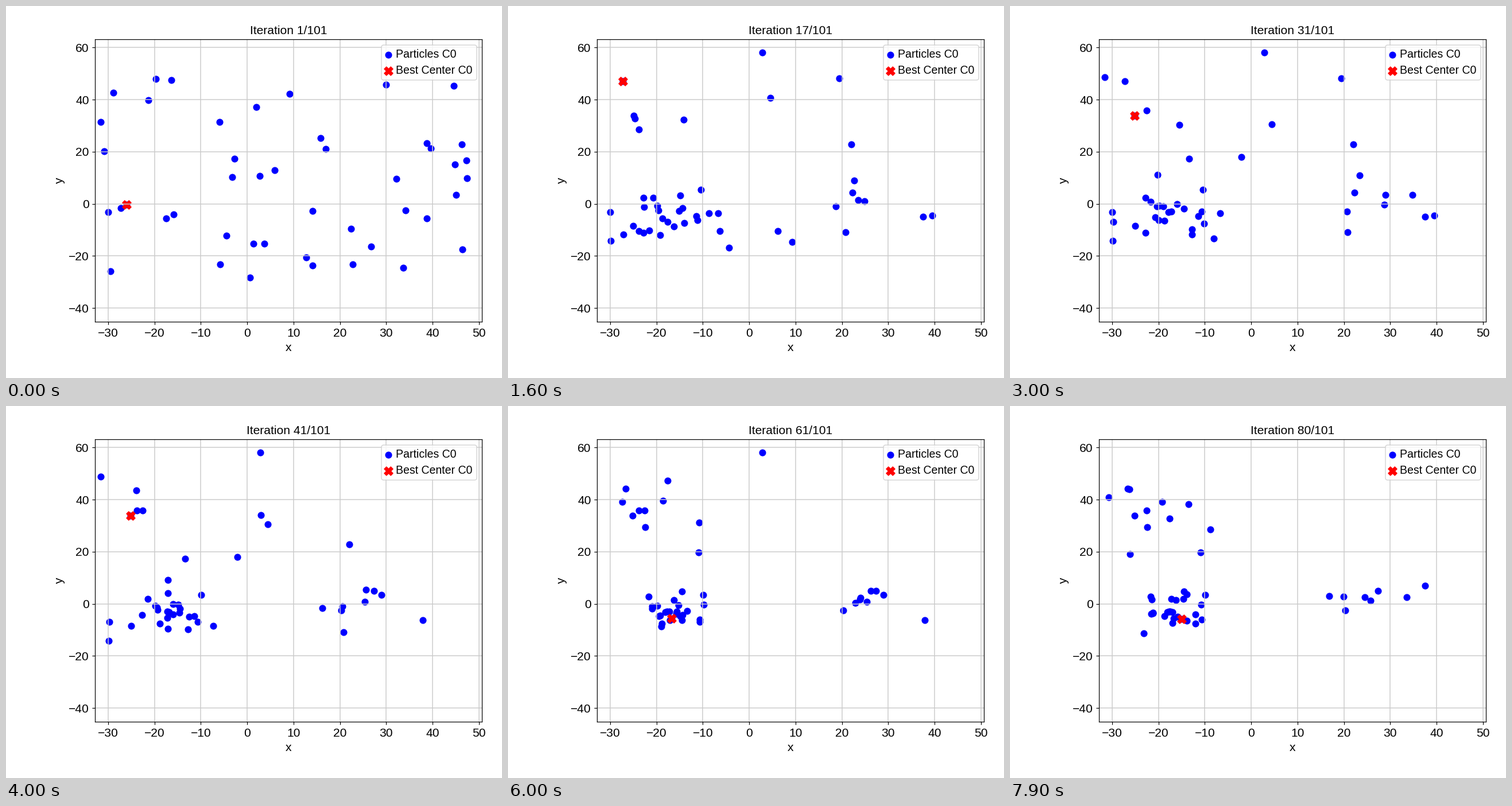
Write a matplotlib script that moves like this. It is 864x648 px and loops after 8 s.

```python
import numpy as np
import matplotlib.pyplot as plt
from matplotlib.animation import FuncAnimation

STEPS, SIZE = 80, 46
LOW, HIGH = (-31.6, -40.4), (49, 58)

# basins the swarm settles in: centre, final spread, share of the particles
CENTRES = np.array([(-16.8, -3.8), (-13, 35), (27, 2)])
SPREADS = np.array([(3.6, 3.8), (9, 9), (5.5, 4.2)])
SHARES = (0.52, 0.28, 0.2)

# step at which a new best centre is found, and where
BEST = {0: (-26, -0.4), 4: (18.7, -1), 12: (-27.3, 47), 23: (-25.1, 33.9),
        56: (-16.7, -5.6), 70: (-15, -5.8)}

plt.rcParams.update({"font.family": "Liberation Sans", "font.size": 14})


def simulate():
    """Particles hold their place and jump now and then, ever closer to home."""
    rng = np.random.default_rng(7)
    home = rng.choice(len(SHARES), SIZE, p=SHARES)
    pos = rng.uniform((-32, -37), (49, 54), (SIZE, 2))
    points, best = [], []
    leader = -1
    for t in range(STEPS):
        if t:
            widen = 1 + 3 * np.exp(-t / 12)
            trial = rng.normal(CENTRES[home], widen * SPREADS[home])
            moves = rng.random(SIZE) < 0.06 + 0.34 * np.exp(-t / 10)
            moves[leader] = False
            pos = np.where(moves[:, None], np.clip(trial, LOW, HIGH), pos)
        if t in BEST:
            leader += 1
            pos[leader] = BEST[t]
        points.append(pos.copy())
        best.append(pos[leader].copy())
    return points, best


points, best = simulate()

fig, ax = plt.subplots(figsize=(8, 6), dpi=108)
fig.subplots_adjust(left=0.1795, right=0.96, bottom=0.151, top=0.91)
dots = ax.scatter(*points[0].T, s=50, c="blue", label="Particles C0")
cross = ax.scatter(*best[0], s=100, c="red", marker="X", label="Best Center C0")
ax.set(xlim=(-32.82, 50.69), ylim=(-45.3, 63.1), xlabel="x", ylabel="y")
ax.set_xticks(range(-30, 51, 10))
ax.set_yticks(range(-40, 61, 20))
ax.grid(color="#cccccc", linewidth=1)
ax.legend(loc="upper right", fontsize=13, handlelength=0.5, handletextpad=0.42,
          borderpad=0.36, labelspacing=0.45)
title = ax.set_title("", fontsize=14)


def draw(i):
    dots.set_offsets(points[i])
    cross.set_offsets([best[i]])
    title.set_text(f"Iteration {i + 1}/101")
    return dots, cross, title


anim = FuncAnimation(fig, draw, frames=STEPS, interval=100, repeat=True)
plt.show()
```
